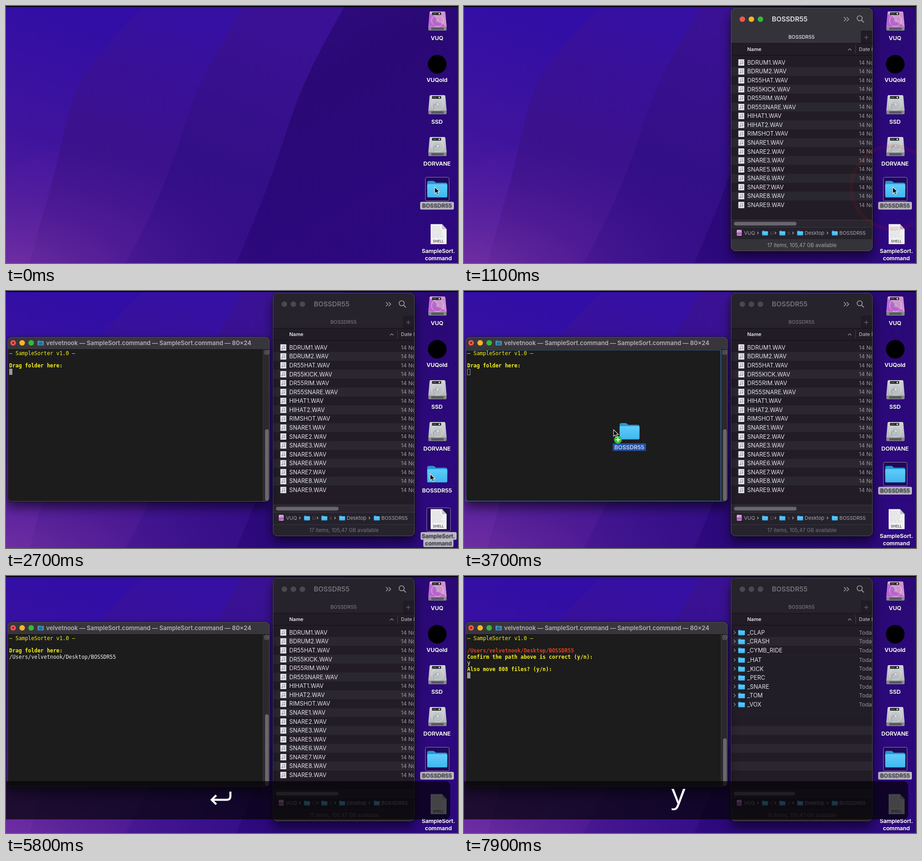
An HTML page for the animation above (8000 ms loop, 991 px wide and 565 px high).

```html
<!DOCTYPE html>
<html lang="en">
<head>
<meta charset="utf-8">
<title>SampleSorter</title>
<style>
html, body { margin: 0; width: 100%; height: 100%; overflow: hidden; background: #2c0b78; }
svg { display: block; width: 100vw; height: 100vh; }
text { white-space: pre; }
</style>
</head>
<body>
<svg id="stage" viewBox="0 0 991 565" xmlns="http://www.w3.org/2000/svg"></svg>
<script>
const LOOP = 8000;
const SANS = "Inter, 'Open Sans', sans-serif";
const MONO = "'DejaVu Sans Mono', 'Liberation Mono', monospace";
const USER = 'velvetnook', DIR = 'BOSSDR55';
const PATH = `/Users/${USER}/Desktop/${DIR}`;

// Markup helpers; text is placed by the middle of its capitals
const rect = (x, y, w, h, fill, r = 0, more = '') =>
  `<rect x="${x}" y="${y}" width="${w}" height="${h}" rx="${r}" fill="${fill}" ${more}/>`;
const circle = (x, y, r, fill, more = '') => `<circle cx="${x}" cy="${y}" r="${r}" fill="${fill}" ${more}/>`;
const path = (d, fill, more = '') => `<path d="${d}" fill="${fill}" ${more}/>`;
const line = (d, stroke, w = 1, more = '') =>
  `<path d="${d}" fill="none" stroke="${stroke}" stroke-width="${w}" ${more}/>`;
const text = (x, y, s, size, fill, weight = 400, anchor = 'start', font = SANS, more = '') =>
  `<text x="${x}" y="${y + size * 0.36}" font-family="${font}" font-size="${size}" font-weight="${weight}" ` +
  `fill="${fill}" text-anchor="${anchor}" ${more}>${s}</text>`;
const group = (id, body, more = '') => `<g id="${id}" ${more}>${body}</g>`;
const at = (x, y, body, k = 1) => `<g transform="translate(${x} ${y}) scale(${k})">${body}</g>`;
const gradient = (id, coords, ...stops) => `<linearGradient id="${id}" ${coords}>` +
  stops.map((c, i) => `<stop offset="${i / (stops.length - 1)}" stop-color="${c}"/>`).join('') + '</linearGradient>';

const defs = `<defs>
  ${gradient('bandA', 'x1="0.3" y1="0" x2="0.1" y2="1"', '#320ea6', '#3f149d', '#541e9c')}
  ${gradient('bandB', 'x1="0.6" y1="0" x2="0.3" y2="1"', '#3610a2', '#3b118d', '#43148e')}
  ${gradient('bandC', 'x1="0.7" y1="0" x2="0.2" y2="1"', '#3a1195', '#330f87', '#350d88')}
  ${gradient('bandD', 'x1="0" y1="0" x2="1" y2="1"', '#340f8a', '#2a0976', '#2d0880')}
  ${gradient('blue', 'x1="0" y1="0" x2="0" y2="1"', '#5fcdfb', '#41b5ee')}
  ${gradient('metal', 'x1="0" y1="0" x2="0" y2="1"', '#d3d6d8', '#adb1b3')}
  ${gradient('pink', 'x1="0" y1="0" x2="1" y2="1"', '#dcc0dc', '#cf8fd0', '#dba0cb')}
  <radialGradient id="glow" gradientUnits="userSpaceOnUse" cx="0" cy="0" r="1"
    gradientTransform="translate(0 590) scale(560 290)">
    <stop offset="0" stop-color="#7c36a4" stop-opacity=".8"/>
    <stop offset=".5" stop-color="#6428a0" stop-opacity=".38"/>
    <stop offset="1" stop-color="#521c9c" stop-opacity="0"/>
  </radialGradient>
  <filter id="shadow" x="-20%" y="-20%" width="140%" height="150%">
    <feDropShadow dx="0" dy="13" stdDeviation="12" flood-color="#000" flood-opacity=".58"/>
  </filter>
  <filter id="labelShadow" x="-20%" y="-30%" width="140%" height="180%">
    <feDropShadow dx="0" dy="1" stdDeviation="1" flood-color="#000" flood-opacity=".6"/>
  </filter>
  <clipPath id="finderClip"><rect x="585" y="4" width="311" height="535" rx="10"/></clipPath>
  <clipPath id="termClip"><rect x="3" y="101" width="575" height="362" rx="9"/></clipPath>
</defs>`;

const wallpaper =
  rect(0, 0, 991, 565, 'url(#bandD)') +
  path('M0 0H743C708 62 676 118 650 180C622 245 612 290 590 350C566 420 545 470 505 565H0Z', 'url(#bandC)') +
  path('M0 0H518C488 62 455 110 428 168C396 236 388 285 362 350C334 425 306 485 262 565H0Z', 'url(#bandB)') +
  path('M0 0H303C255 46 196 105 163 165C140 212 130 265 112 345C98 405 78 465 52 565H0Z', 'url(#bandA)') +
  path('M0 375C35 350 65 322 118 318L52 565H0Z', '#5c25a6', 'opacity=".12"') +
  rect(0, 0, 991, 565, 'url(#glow)') +
  rect(0, 0, 991, 2, '#000');

const folder = (x, y, k = 1) => at(x, y,
  path('M-22-14Q-22-18-18-18H-9Q-7-18-5-16L-3-14H18Q22-14 22-10V0H-22Z', '#2796d6') +
  rect(-22, -11, 44, 29.5, 'url(#blue)', 3) +
  line('M-20 18H20', '#2f95cd', 1), k);

const drive = (x, y, tint) => at(x, y,
  path('M-15-21H15Q17-21 17.3-18L20 12V18Q20 21 17 21H-17Q-20 21-20 18V12L-17.3-18Q-17-21-15-21Z', tint || 'url(#metal)') +
  path('M-20 13H20V18Q20 21 17 21H-17Q-20 21-20 18Z', '#85888b') +
  line('M-13 17H13', '#3f4246', 5, 'stroke-dasharray="2 1"') +
  (tint ? path('M-17-17L-6-10L3 3L12 7L19 12H-20Z', '#b042d2', 'opacity=".6"') : '') +
  circle(0, -1, 13, 'none', 'stroke="#eceeef" stroke-opacity=".7"') +
  circle(0, -1, 4, '#d5d9db', `stroke="#90979b" stroke-width=".8" opacity="${tint ? 0.4 : 1}"`) +
  line('M-1-1C-9-3-11 6-7 10', '#7f898e', 1) +
  rect(-12, -19, 20, 6, '#25272a', 1) + circle(4, -16, 1.7, '#eee') + line('M-10-16H-2', '#888', 1));

const shellFile = at(948, 501.5,
  path('M-17-22H8L18-11V22H-17Z', '#f1f1f1') + path('M8-22L18-11H8Z', '#c3c3c8') +
  Array.from({ length: 9 }, (_, i) =>
    line(`M-13 ${-17 + i * 3}h${i < 3 ? 17 : 20 + (i * 5) % 6}`, '#c9c9cc', 1, `stroke-dasharray="${3 + i % 4} 1.5"`)).join('') +
  text(0, 16, 'SHELL', 7.6, '#4b4b4f', 600, 'middle'));

const label = (x, y, s, id = '') =>
  text(x, y, s, 12.3, '#fff', 600, 'middle', SANS, (id && `class="${id}"`) + ' filter="url(#labelShadow)"');
const selection = (x, y) => rect(x, y, 52, 52, '#1b0b4a', 3, 'fill-opacity=".75" stroke="#8e84a8" stroke-width="1"');

const desktop =
  drive(946, 33, 'url(#pink)') + label(945, 71, 'VUQ') +
  circle(945.5, 128, 20.5, '#000') + label(945, 163, 'VUQold') +
  drive(946, 217) + label(945, 255, 'SSD') +
  drive(946, 309) + label(945, 347, 'DORVANE') +
  group('dirSel', selection(919.5, 376.5) + rect(908, 430.5, 74, 17, '#bcb9c4', 3)) +
  folder(945.5, 402.5) + label(945, 439, DIR, 'dirLabel') +
  group('fileSel', selection(922.5, 476.5) + rect(909, 530, 79, 17, '#bcb9c4', 3) + rect(915, 546, 66, 17, '#bcb9c4', 3)) +
  shellFile + label(948, 539, 'SampleSort.', 'fileLabel') + label(948, 555, 'command', 'fileLabel');

const lights = (x, y, cls) => ['#f0574f', '#f6b429', '#36b93c']
  .map((c, i) => circle(x + i * 19.8, y, 6.1, c, `class="${cls}"`)).join('');

const samples = ['BDRUM1', 'BDRUM2', 'DR55HAT', 'DR55KICK', 'DR55RIM', 'DR55SNARE', 'HIHAT1', 'HIHAT2', 'RIMSHOT',
  ...[1, 2, 3, 5, 6, 7, 8, 9].map(n => 'SNARE' + n)];
const sorted = ['CLAP', 'CRASH', 'CYMB_RIDE', 'HAT', 'KICK', 'PERC', 'SNARE', 'TOM', 'VOX'];
const rowY = i => 124.2 + i * 19.58;
const row = (y, name, date, icon) => icon + text(621, y, name, 12.7, '#e4e2e8') + text(866, y, date, 12, '#98959e');
const sampleRow = (s, i) => row(rowY(i), s + '.WAV', '14 Nov 2022',
  at(608, rowY(i), rect(-6.5, -7, 13, 14, '#e6e6e8') + line('M-1.5 3V-3L3-4V2', '#8d8d93', 1) +
    circle(-2.5, 3, 1.4, '#8d8d93') + circle(2, 2, 1.4, '#8d8d93')));
const folderRow = (s, i) => {
  const y = rowY(i) + (i > 2 ? 1.5 : 0);
  return row(y, '_' + s, 'Today', line(`M591.5 ${y - 3.5}l3.5 3.5l-3.5 3.5`, '#a09da6', 1.2) + folder(608.5, y, 0.33));
};

const crumb = (x, s, fade = 1) => text(x, 499, s, 11, '#aaa7b0', 400, 'start', SANS, `opacity="${fade}"`);
const arrow = x => line(`M${x} 496.5l2.5 2.5l-2.5 2.5`, '#b5b2ba', 1.2);

// Window edge: a dark hairline outside, a light one inside
const edge = (x, y, w, h, r) =>
  rect(x - 0.5, y - 0.5, w + 1, h + 1, 'none', r + 0.5, 'stroke="#000" stroke-opacity=".6"') +
  rect(x + 0.5, y + 0.5, w - 1, h - 1, 'none', r - 0.5, 'stroke="#57545d"');

const finder =
  rect(585, 4, 311, 535, '#211e27', 10, 'filter="url(#shadow)"') +
  `<g clip-path="url(#finderClip)">` +
  rect(585, 4, 311, 78, '#35333a', 0, 'class="bar"') +
  rect(870, 54, 26, 28, '#1f1c25') + line('M877.5 69H886.5M882 64.5V73.5', '#77747c', 1) +
  line('M585 82H896M585 108.5H896', '#100e14', 1) + line('M858.5 86V104', '#45424b', 1) +
  lights(610.3, 29, 'light') +
  text(675, 29, DIR, 14.7, '#e3e1e6', 600, 'start', SANS, 'class="title"') +
  line('M833 24.5l4.5 4.5l-4.5 4.5M839 24.5l4.5 4.5l-4.5 4.5', '#aaa7ae', 1.4) +
  circle(867.5, 27, 5.6, 'none', 'stroke="#aaa7ae" stroke-width="1.5"') + line('M871.7 31.2l5 5', '#aaa7ae', 1.7) +
  text(740, 68.5, DIR, 10.9, '#e3e1e6', 500, 'middle', SANS, 'class="title"') +
  text(621, 95, 'Name', 11, '#e8e6ea', 600) + text(866, 95, 'Date Modified', 11, '#b3b0b8', 500) +
  line('M842 97.5l3.7-3.7l3.7 3.7', '#9a979f', 1.2) +
  Array.from({ length: 8 }, (_, i) => rect(585, rowY(2 * i + 1) - 9.8, 311, 19.6, '#2a2731')).join('') +
  group('samples', samples.map(sampleRow).join('')) +
  group('sorted', rect(585, 173.5, 311, 137, '#211e27') + sorted.map(folderRow).join('')) +
  rect(585, 471, 311, 15, '#29262f') + line('M585 470.5H896M585 486.5H896', '#3b3841', 1) +
  rect(592, 474.5, 137, 8, '#69666e', 4, 'id="thumb"') +
  rect(585, 487, 311, 26, '#25222b') +
  rect(585, 513, 311, 26, '#35333a', 0, 'class="bar"') + line('M585 513.5H896', '#3b3841', 1) +
  rect(598, 492, 11, 13, 'url(#pink)', 2) + rect(598, 498, 11, 5, '#9c4cba', 1, 'opacity=".7"') +
  crumb(614, 'VUQ') + arrow(643) + folder(660, 499, 0.29) + crumb(671, 'U', 0.4) + arrow(681.5) +
  folder(698, 499, 0.29) + crumb(709, USER[0], 0.4) + arrow(720) + folder(737, 499, 0.29) + crumb(747, 'Desktop') + arrow(795.5) +
  folder(813, 499, 0.29) + crumb(823, DIR) +
  text(741, 526, '', 11.2, '#a8a5ad', 400, 'middle', SANS, 'id="status"') +
  `</g>` + edge(585, 4, 311, 535, 10);

const terminal =
  rect(3, 101, 575, 362, '#1d1d1e', 9, 'filter="url(#shadow)"') +
  `<g clip-path="url(#termClip)">` +
  rect(3, 101, 575, 27, '#38363c') + rect(563, 128, 15, 335, '#2b292e') +
  line('M3 128.5H578', '#131214') + line('M563.5 128V463', '#3b393e') +
  rect(567.5, 130.5, 8.5, 8.5, 'none', 1, 'stroke="#85838a"') + line('M569 133.5H575M569 136H575', '#85838a') +
  rect(568, 304, 8, 157, '#69676c', 4, 'id="scroll"') + `</g>` +
  edge(3, 101, 575, 362, 9) +
  lights(15.6, 114, 'tl') + circle(15.6, 114, 2, '#6d120f') +
  group('titleA', text(290, 114, 'SampleSort.command — -zsh — 80×24', 13, '#b4b1b8', 600, 'middle')) +
  group('titleB', `<g opacity=".65">${folder(76, 114, 0.31)}</g>` + rect(72, 112, 8, 6, '#174f78', 1, 'opacity=".6"') +
    text(88, 114, USER + ' — SampleSort.command — SampleSort.command — 80×24', 13, '#b4b1b8', 600)) +
  group('lines', '') +
  group('dropZone', line('M3.5 129.5H563V462H4Z', '#31628f', 1.6));

const pointer = path('M0 0V14.5L3.4 11.4L5.8 16.8L8.4 15.7L6 10.5H10.6Z', '#000', 'stroke="#f2f2f2" stroke-width="1.1"');
const beamShape = 'M-4-8Q-1-8 0-6.5Q1-8 4-8M0-7V7M-4 8Q-1 8 0 6.5Q1 8 4 8M-2 2H2';
const beam = line(beamShape, '#eee', 3.4) + line(beamShape, '#111', 1.2);

const ghost = at(35, 3, folder(0, 0, 0.99)) + rect(-2, 30, 73, 16.5, '#234fa6', 2) +
  text(34.5, 38.5, DIR, 12.3, '#c7d3ea', 600, 'middle') +
  group('plus', circle(9.5, 22, 8.6, '#35bb3d') + line('M4.5 22H14.5M9.5 17V27', '#fff', 2));

const overlay = rect(-20, 451, 994, 84, '#050308', 11, 'fill-opacity=".72"') +
  group('keyEnter', line('M451 492H484Q492 492 492 484V474M461 482L451 492L461 502', '#fff', 4.5)) +
  group('keyY', text(470, 478, 'y', 61, '#fff', 500, 'middle', "'Open Sans', sans-serif"));

document.getElementById('stage').innerHTML = defs + wallpaper + desktop +
  group('finder', finder) + group('terminal', terminal) + group('rings', '') +
  group('ghost', ghost) + group('pointer', pointer) + group('beam', beam) + group('overlay', overlay);

const $ = id => document.getElementById(id);
const show = (id, on) => $(id).setAttribute('display', on ? 'inline' : 'none');
const paint = (cls, fill) => document.querySelectorAll('.' + cls).forEach(e => e.setAttribute('fill', fill));
const clamp = v => Math.max(0, Math.min(1, v));
const mix = (a, b, k) => a + (b - a) * k;
const smooth = k => k * k * (3 - 2 * k);

// Pointer stops: departure time, arrival time, x, y
const moves = [[1200, 1650, 937, 503], [2200, 2700, 930, 402], [2900, 3700, 328, 305], [3800, 4200, 312, 300]];
// Mouse releases: time, x, y, how long the ring stays
const clicks = [[410, 940, 399, 500], [610, 940, 399, 500], [1780, 937, 504, 500], [1980, 937, 504, 500], [4300, 312, 300, 800]];

function pointerAt(t) {
  let x = 940, y = 398;
  for (const [a, b, tx, ty] of moves) {
    const k = smooth(clamp((t - a) / (b - a)));
    x = mix(x, tx, k);
    y = mix(y, ty, k);
  }
  return [x, y];
}

function ring([start, x, y, life], t) {
  const age = t - start;
  if (age < 0 || age >= life) return '';
  const p = clamp(age / 500), r = 91 * (1 - (1 - p) ** 2);
  return circle(x, y, r, 'none', `stroke="#c8140f" stroke-width="${13.3 - 5.5 * p}" stroke-opacity="${0.98 - 0.9 * p}"`) +
    circle(x, y, 14, '#ea1414', `opacity="${clamp(1 - (p - 0.25) * 6)}"`);
}

function screenLines(t) {
  const out = [], yellow = '#f4f01a', white = '#f2f2f2';
  const put = (n, s, fill, weight = 400) => out.push(text(7, 136.8 + n * 13.6, s, 11.44, fill, weight, 'start', MONO));
  const block = (col, n, hollow) => out.push(hollow
    ? rect(7.5 + col * 6.887, 171.5, 6, 13, 'none', 0, 'stroke="#9b9b9d"')
    : rect(7 + col * 6.887, 130 + n * 13.6, 7, 13.5, '#9b9b9d'));
  if (t < 2300) {
    block(0, 0);
    return out.join('');
  }
  put(0, '– SampleSorter v1.0 –', yellow);
  if (t < 6800) {
    put(2, 'Drag folder here:', yellow, 700);
    if (t >= 4300) put(3, PATH, white);
    if (t < 4300) block(0, 3, t >= 2800);
    else if (t < 5800) block(PATH.length + 1, 3);
  } else {
    put(2, PATH, '#dc3f1e', 700);
    put(3, 'Confirm the path above is correct (y/n):', yellow, 700);
    if (t >= 7100) {
      put(4, 'y', white);
      put(5, 'Also move 808 files? (y/n):', yellow, 700);
    }
    block(0, t < 7100 ? 4 : 6);
  }
  return out.join('');
}

function draw(t) {
  const [x, y] = pointerAt(t);
  const active = t < 2000, done = t >= 7900;

  const dirOn = t < 1700 || t >= 2800, fileOn = t >= 1700 && t < 2800;
  show('dirSel', dirOn);
  show('fileSel', fileOn);
  paint('dirLabel', dirOn ? '#4a4850' : '#fff');
  paint('fileLabel', fileOn ? '#4a4850' : '#fff');

  const open = smooth(clamp((t - 600) / 300)), k = mix(0.1, 1, open);
  show('finder', open > 0);
  $('finder').setAttribute('transform',
    `translate(${mix(945, 740.5, open)} ${mix(402, 271.5, open)}) scale(${k}) translate(-740.5 -271.5)`);
  $('finder').setAttribute('opacity', clamp(open * 1.5));
  paint('bar', active ? '#35333a' : '#26232c');
  paint('title', active ? '#e3e1e6' : '#75727a');
  document.querySelectorAll('.light').forEach((e, i) =>
    e.setAttribute('fill', active ? ['#f0574f', '#f6b429', '#36b93c'][i] : '#4b4851'));
  show('samples', !done);
  show('sorted', done);
  $('thumb').setAttribute('width', done ? 134 : 137);
  $('status').textContent = (done ? 10 : 17) + ' items, 105,47 GB available';
  $('status').setAttribute('fill', active ? '#a8a5ad' : '#77747c');

  show('terminal', t >= 2000);
  show('titleA', t < 2300);
  show('titleB', t >= 2300);
  $('lines').innerHTML = screenLines(t);
  const top = t < 6800 ? 304 : 357;
  show('scroll', t >= 2300);
  $('scroll').setAttribute('y', top);
  $('scroll').setAttribute('height', 461 - top);

  const dragging = t >= 2900 && t < 4300, over = dragging && x < 578;
  show('dropZone', over);
  show('plus', over);
  show('ghost', dragging);
  show('pointer', t < 4300);
  show('beam', t >= 4300 && t < 5100);
  for (const id of ['ghost', 'pointer', 'beam']) $(id).setAttribute('transform', `translate(${x} ${y})`);
  $('rings').innerHTML = clicks.map(c => ring(c, t)).join('');

  const enter = t >= 5100 && t < 6200, yes = t >= 7100;
  show('overlay', enter || yes);
  show('keyEnter', enter);
  show('keyY', yes);
  $('overlay').setAttribute('opacity', (t < 5200 || t >= 6100) && t < 7200 ? 0.5 : 1);
}

let last = -1;
function tick() {
  const t = Math.floor(performance.now() % LOOP / 100) * 100;
  if (t !== last) draw(last = t);
  requestAnimationFrame(tick);
}
tick();
</script>
</body>
</html>
```
